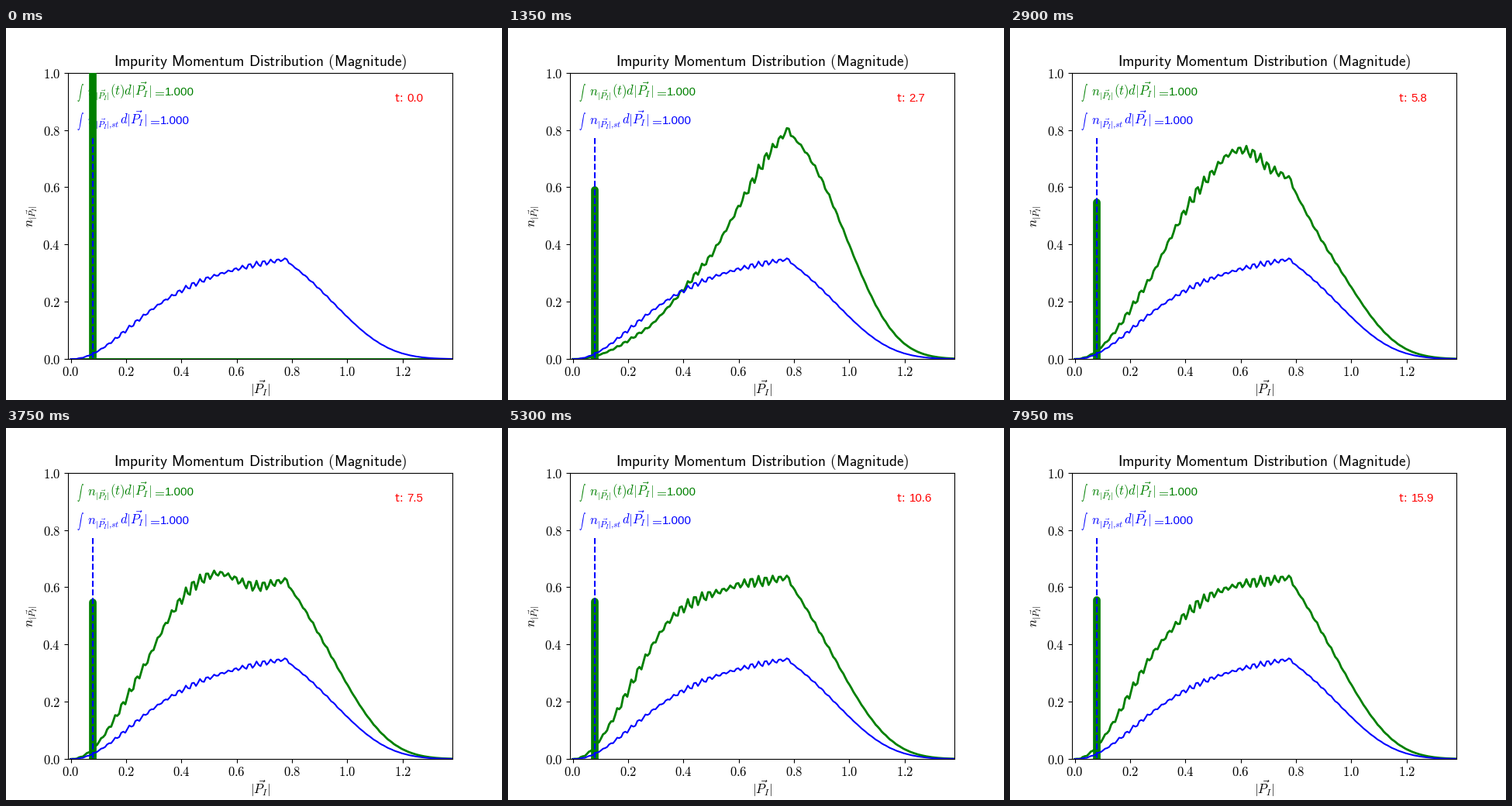
These frames come from a looping animation (640 by 480 pixels, 8 s). A matplotlib script:

```python
import numpy as np
import matplotlib.pyplot as plt
from matplotlib.animation import FuncAnimation

plt.rcParams['mathtext.fontset'] = 'cm'

W, H = 640, 480
FRAMES, INTERVAL = 160, 50
DT = 0.1
X_MIN, X_MAX = -0.01, 1.38
P0 = 0.08                      # position of the coherent peak
EDGE = 0.787                   # kink of the steady distribution

# Key points of the relaxation: momentum, frequency, damping, final gain
KEY_P = [0, 0.28, 0.5, 0.7, 0.9, 1.2]
KEY_FREQ = [0.22, 0.285, 0.49, 0.79, 0.98, 1.28]
KEY_DAMP = [0.168, 0.247, 0.30, 0.25, 0.20, 0.20]
KEY_GAIN = [2.3, 2.2, 2.03, 1.85, 1.77, 1.76]


def steady_curve(p):
    """Saturating rise, exponential fall, and a beating grid ripple."""
    odds = 1.4 * (p / 0.4) ** 2.1
    rise = 0.41 * odds / (1 + odds)
    d = np.maximum(p - EDGE, 0)
    fall = 0.337 * np.exp(-d * (2.1 + 5 * d + 16 * d ** 2))
    beat = 1 + 0.5 * np.cos(2 * np.pi * (p - 0.674) / 0.2354)
    ripple = 0.007 * np.tanh(4 * p) * beat * np.cos(2 * np.pi * (p - 0.0573) / 0.0256)
    return np.where(p < EDGE, rise + ripple, fall * (1 + ripple))


def area(y):
    return np.sum((y[1:] + y[:-1]) / 2 * np.diff(grid))


grid = np.linspace(0, X_MAX, 190)
steady = steady_curve(grid)
freq = np.interp(grid, KEY_P, KEY_FREQ)
damp = np.interp(grid, KEY_P, KEY_DAMP)
final = np.interp(grid, KEY_P, KEY_GAIN)


def curve(t):
    """Damped oscillator starting at rest for every momentum."""
    phase = freq * t
    swing = np.cos(phase) + damp / freq * np.sin(phase)
    decay = np.exp(-damp * t - (phase / 5.5) ** 6)
    return steady * final * (1 - decay * swing)


fig, ax = plt.subplots(figsize=(W / 100, H / 100), dpi=100)
fig.subplots_adjust(left=0.125, right=0.9, bottom=0.11, top=0.88)
ax.set_xlim(X_MIN, X_MAX)
ax.set_ylim(0, 1)
x_ticks = np.arange(7) * 0.2
y_ticks = np.arange(6) * 0.2
ax.set_xticks(x_ticks, [f'${v:.1f}$' for v in x_ticks], fontsize=12)
ax.set_yticks(y_ticks, [f'${v:.1f}$' for v in y_ticks], fontsize=12)
ax.tick_params(axis='x', pad=2)

SPACE = r'\hspace{0.38}'
title = SPACE.join(['Impurity', 'Momentum', 'Distribution', '(Magnitude)'])
ax.set_title(r'$\mathsf{' + title + '}$', fontsize=14)


def put(s, x, y, size=12, color='black', **kw):
    return ax.text(x / W, 1 - y / H, s, fontsize=size, color=color,
                   transform=fig.transFigure, va='baseline',
                   rotation_mode='anchor', **kw)


def number(s, x, y, color):
    return put(s, x, y, 10.8, color, family='Liberation Sans')


VEC = r'|\vec{P_I}|'
put(f'${VEC}$', 328, 472, ha='center')
put('$n$', 35, 256.9, rotation=90)
put(f'${VEC}$', 39.3, 246.9, 8, rotation=90)


def integral(y, color, sub, rest, x_rest, x_equals):
    put(r'$\int$', 90.7, y - 1.4, 6, color)
    put('$n$', 104.6, y, color=color)
    put(f'${sub}$', 114.6, y + 5, 8, color)
    put(f'${rest}$', x_rest, y, color=color)
    put('$=$', x_equals, y, color=color)
    number('1.000', x_equals + 15.9, y, color)


integral(87.2, 'green', VEC, '(t)d' + VEC, 133.6, 188.7)
integral(124.2, 'blue', VEC + r',\hspace{-0.2}st', 'd' + VEC, 147, 183.1)

put(r'$\mathsf{t}\hspace{-0.2}:$', 501.2, 94.6, color='red')
clock = number('', 517.4, 94.6, 'red')

moving, = ax.plot(grid, 0 * grid, color='green', lw=2)
bar, = ax.plot([P0, P0], [0, 1], color='green', lw=7,
               solid_capstyle='round', zorder=4)
ax.plot(grid, steady, color='blue', lw=1.5, zorder=5)
ax.plot([P0, P0], [1 - area(steady), 0], '--', color='blue', lw=1.5, zorder=5)


def draw(i):
    t = i * DT
    y = curve(t)
    moving.set_ydata(y)
    bar.set_ydata([0, 1 - area(y)])    # total weight is conserved
    clock.set_text(f'{t:.1f}')
    return moving, bar, clock


anim = FuncAnimation(fig, draw, frames=FRAMES, interval=INTERVAL,
                     repeat=True, repeat_delay=0, blit=False)
plt.show()
```
